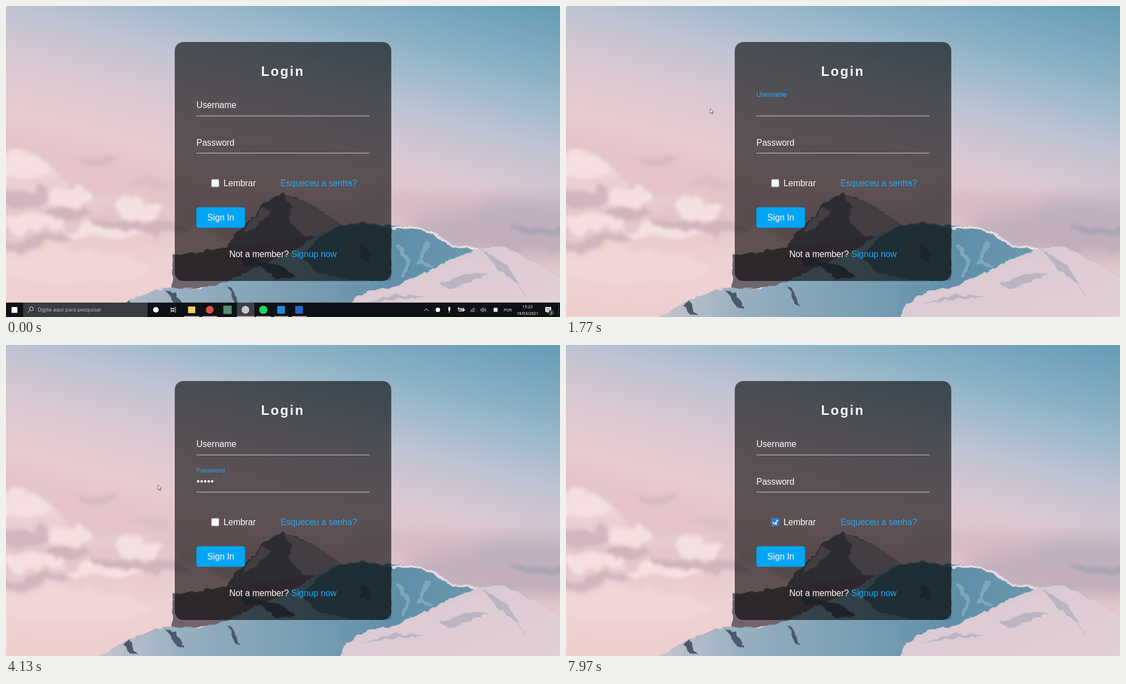
Animation, 998 px wide and 561 px high, one loop 8000 ms. Source, as an HTML page:

```html
<!DOCTYPE html>
<html lang="pt">
<head>
<meta charset="utf-8">
<title>Login</title>
<style>
html, body { margin: 0; width: 100%; height: 100%; overflow: hidden; background: #e3c6c9; }
svg { position: absolute; inset: 0; width: 100%; height: 100%; display: block; }
#scene { will-change: transform; }
text { white-space: pre; }
.form text { font: 15.6px "Liberation Sans", Arial, sans-serif; fill: #fff; }
.form .title { font-size: 24px; font-weight: bold; letter-spacing: 2.6px; }
.form .link { fill: #22abfa; }
.popup text { font: 600 7.8px "Open Sans", "Noto Sans", sans-serif; fill: #f1f1f2; }
.bar text { font: 7.35px "Open Sans", "Noto Sans", sans-serif; fill: #fff; }
.bar .hint { font-size: 9.42px; fill: #c9cacb; }

/* One loop is 8 s, so 1% is 80 ms. */
.anim, .anim text { animation: 8s ease infinite; }
.step { animation-timing-function: step-end; }

.bar { animation-name: bar; }
@keyframes bar { 0% { opacity: 1 } 13.45%, 100% { opacity: 0 } }
.active { animation-name: active; }
@keyframes active { 0% { opacity: 1 } 11.2%, 100% { opacity: 0 } }
.popup { animation-name: popup; }
@keyframes popup { 0% { opacity: 0 } 13.45% { opacity: 1 } 21.7%, 100% { opacity: 0 } }

.form .user { animation-name: user; }
@keyframes user {
  0%, 13.6% { transform: none; fill: #fff }
  19.85%, 21.75% { transform: translateY(-21.3px) scale(.75); fill: #20a8f1 }
  28%, 100% { transform: none; fill: #fff }
}
.form .pass { animation-name: pass; }
@keyframes pass {
  0%, 33.25% { transform: none; fill: #fff }
  39.5%, 78% { transform: translateY(-21.3px) scale(.75); fill: #20a8f1 }
  84.25%, 100% { transform: none; fill: #fff }
}

.caret1 { animation-name: caret1; }
@keyframes caret1 { 0% { opacity: 0 } 13.45% { opacity: 1 } 20%, 100% { opacity: 0 } }
.caret2 { animation-name: caret2; }
@keyframes caret2 {
  0% { opacity: 0; transform: none }
  33.25% { opacity: 1 }
  40% { opacity: 0 }
  40.75% { opacity: 1; transform: translateX(6.3px) }
  42.25% { transform: translateX(12.6px) }
  43.75% { transform: translateX(18.9px) }
  44.6% { transform: translateX(25.2px) }
  45% { opacity: 1; transform: translateX(31.5px) }
  51.25% { opacity: 0; transform: none }
  71.2% { opacity: 1 }
  78%, 100% { opacity: 0; transform: none }
}
.typed { animation-name: typed; }
@keyframes typed {
  0% { clip-path: inset(0 100% 0 0) }
  40.75% { clip-path: inset(0 80% 0 0) }
  42.25% { clip-path: inset(0 60% 0 0) }
  43.75% { clip-path: inset(0 40% 0 0) }
  44.6% { clip-path: inset(0 20% 0 0) }
  45% { clip-path: inset(0) }
  71.2%, 100% { clip-path: inset(0 100% 0 0) }
}
.marked { animation-name: marked; transform-box: fill-box; transform-origin: right; }
@keyframes marked {
  0%, 60.9% { transform: scaleX(0); animation-timing-function: linear }
  62.4% { transform: none; animation-timing-function: step-end }
  71.2%, 100% { transform: scaleX(0) }
}
.checked { animation-name: checked; }
@keyframes checked { 0% { opacity: 0 } 98.7%, 100% { opacity: 1 } }

.pointer { animation-name: move; animation-timing-function: ease-in-out; }
@keyframes move {
  0% { transform: translate(470px, 575px); animation-timing-function: linear }
  4% { transform: translate(548px, 446px); animation-timing-function: linear }
  7% { transform: translate(462px, 265px); animation-timing-function: linear }
  9% { transform: translate(396px, 147px) }
  11.6%, 14% { transform: translate(378.6px, 174.5px) }
  21.2%, 24% { transform: translate(259.7px, 185px) }
  32.5%, 48.2% { transform: translate(369.3px, 250px) }
  51.2%, 55.2% { transform: translate(273.7px, 252.5px) }
  60%, 60.4% { transform: translate(396px, 246px) }
  63.8%, 75.3% { transform: translate(307px, 248px) }
  77.5%, 78.4% { transform: translate(268px, 254px) }
  85.5%, 86% { transform: translate(361px, 283px) }
  95%, 100% { transform: translate(376px, 317px) }
}
.arrow { animation-name: arrow; }
@keyframes arrow {
  0% { opacity: 1 } 9.9% { opacity: 0 } 17% { opacity: 1 } 29.6% { opacity: 0 }
  49.2% { opacity: 1 } 57.8% { opacity: 0 } 63.6%, 100% { opacity: 1 }
}
.beam { animation-name: beam; }
@keyframes beam {
  0% { opacity: 0 } 9.9% { opacity: 1 } 17% { opacity: 0 } 29.6% { opacity: 1 }
  40.75% { opacity: 0 } 48.3% { opacity: 1 } 49.2% { opacity: 0 }
  57.8% { opacity: 1 } 63.6%, 100% { opacity: 0 }
}
</style>
</head>
<body>
<svg id="scene" viewBox="0 0 998 561">
  <defs>
    <linearGradient id="sky" gradientUnits="userSpaceOnUse" x1="998" y1="0" x2="876" y2="468">
      <stop offset="0" stop-color="#639bb5"/><stop offset=".32" stop-color="#94b6c9"/>
      <stop offset=".52" stop-color="#bfc3d2"/><stop offset=".7" stop-color="#d8c8d1"/>
      <stop offset=".9" stop-color="#e7cbcf"/><stop offset="1" stop-color="#e4c4c8"/>
    </linearGradient>
    <linearGradient id="mist" x2="0" y2="1">
      <stop offset="0" stop-color="#efd8da"/><stop offset=".35" stop-color="#e2c5ca"/>
      <stop offset=".6" stop-color="#eed2d3"/><stop offset="1" stop-color="#efcdcc"/>
    </linearGradient>
    <linearGradient id="slope" gradientUnits="userSpaceOnUse" x1="165" y1="0" x2="998" y2="0">
      <stop offset="0" stop-color="#c5c4ce"/><stop offset=".2" stop-color="#93aebf"/>
      <stop offset=".42" stop-color="#7c9fb3"/><stop offset=".65" stop-color="#5f8fa9"/>
      <stop offset="1" stop-color="#78a0b5"/>
    </linearGradient>
    <linearGradient id="snow" x2="1" y2="1">
      <stop offset="0" stop-color="#b7b9c7"/><stop offset=".4" stop-color="#dccbd3"/><stop offset="1" stop-color="#e3cfd5"/>
    </linearGradient>
    <filter id="puff" x="-20%" y="-20%" width="140%" height="140%">
      <feTurbulence type="fractalNoise" baseFrequency=".022" numOctaves="4" seed="5"/>
      <feDisplacementMap in="SourceGraphic" scale="42" xChannelSelector="R" yChannelSelector="G"/>
      <feGaussianBlur stdDeviation="3"/>
    </filter>
    <filter id="soft" x="-50%" y="-80%" width="200%" height="260%"><feGaussianBlur stdDeviation="16"/></filter>
    <filter id="rough" x="-10%" y="-10%" width="120%" height="120%">
      <feTurbulence type="fractalNoise" baseFrequency=".07" numOctaves="3" seed="2"/>
      <feDisplacementMap in="SourceGraphic" scale="9" xChannelSelector="R" yChannelSelector="G"/>
      <feGaussianBlur stdDeviation=".5"/>
    </filter>
  </defs>
  <rect width="998" height="561" fill="url(#sky)"/>
  <g filter="url(#soft)">
    <ellipse cx="930" cy="400" rx="210" ry="55" fill="#b5a7b7" opacity=".75"/>
    <ellipse cx="730" cy="360" rx="120" ry="30" fill="#d3b8c0" opacity=".7"/>
    <ellipse cx="480" cy="400" rx="190" ry="40" fill="#d5b5bb" opacity=".7"/>
  </g>
  <g filter="url(#puff)">
    <ellipse cx="168" cy="278" rx="46" ry="9" fill="#d3bac4" opacity=".8"/>
    <ellipse cx="262" cy="322" rx="50" ry="8" fill="#d9bfc6" opacity=".7"/>
    <ellipse cx="965" cy="404" rx="52" ry="7" fill="#9d9cae" opacity=".75"/>
    <ellipse cx="840" cy="408" rx="80" ry="9" fill="#c4b0bb" opacity=".7"/>
    <ellipse cx="940" cy="430" rx="80" ry="10" fill="#c0adb8" opacity=".6"/>
    <path fill="url(#mist)" d="M-30 268L40 264 85 284 105 312 150 332 190 350 250 346 310 378 420 430V600H-30Z"/>
    <g fill="#f5e1e1">
      <ellipse cx="30" cy="292" rx="48" ry="22"/><ellipse cx="112" cy="342" rx="46" ry="18"/>
      <ellipse cx="235" cy="365" rx="45" ry="13"/><ellipse cx="50" cy="392" rx="60" ry="13"/>
      <ellipse cx="170" cy="410" rx="70" ry="12"/>
    </g>
    <g fill="#c6a9b6" opacity=".62">
      <ellipse cx="28" cy="345" rx="48" ry="18"/><ellipse cx="112" cy="376" rx="50" ry="11"/>
      <ellipse cx="48" cy="424" rx="62" ry="10"/><ellipse cx="222" cy="392" rx="60" ry="9"/>
      <ellipse cx="285" cy="402" rx="40" ry="11"/>
    </g>
    <ellipse cx="110" cy="470" rx="150" ry="28" fill="#f2d9d9" opacity=".8"/>
  </g>
  <g filter="url(#rough)">
    <path fill="#6d727d" d="M398 436L412 410 440 386 460 360 480 346 499 338 530 349 560 363 600 392 560 424 470 434Z"/>
    <path fill="#a69ca3" d="M499 338L516 362 508 384 534 412 560 422 600 392 560 363ZM462 362L478 372 452 398 426 412 440 388Z"/>
    <path fill="#6f656d" d="M300 448L345 444 400 434 470 425 560 416 610 420 480 485 400 505 300 512Z"/>
    <path fill="url(#slope)" d="M160 566L215 534 270 512 305 508 350 511 400 496 450 472 520 440 560 415 600 394 640 390 700 397 735 398 770 409 805 433 850 437 893 432 935 453 1005 492V570Z"/>
    <path fill="#4f6f84" d="M600 396L640 392 694 400 694 496H620L560 480 530 450 562 420Z"/>
    <path fill="url(#snow)" d="M600 570L612 537 650 514 700 506 760 480 800 457 850 437 893 432 935 453 1005 492V570Z"/>
    <path fill="none" stroke="#e7dbe0" stroke-width="4" d="M694 401L735 399 770 410 805 434 850 438"/>
    <path fill="none" stroke="#8fb1c3" stroke-width="7" opacity=".7" d="M705 430L725 460 715 490M760 425L745 462 770 470"/>
    <path fill="#a9a9bb" opacity=".65" d="M860 440L905 470 940 530 920 500 880 470ZM640 540L700 520 760 524 690 530ZM780 500L840 480 870 485 800 510Z"/>
    <path fill="#4d5968" d="M288 514L306 518 320 546 308 542ZM220 532L230 546 238 560 226 556 212 540ZM400 506L412 520 424 542 410 536ZM414 448L446 452 462 466 430 470ZM452 460L500 470 522 488 484 492ZM640 428L654 440 656 466 640 454Z"/>
  </g>
</svg>

<svg viewBox="0 0 998 561">
  <rect x="304" y="65" width="390" height="431" rx="15.5" opacity=".6"/>
  <g class="form">
    <text class="title" x="459.6" y="125.7">Login</text>
    <path stroke="#d0cbcb" d="M343 198.3H655M343 265.3H655"/>
    <g class="anim" transform="translate(343 184)"><text class="user">Username</text></g>
    <g class="anim" transform="translate(343 251.5)"><text class="pass">Password</text></g>
    <rect class="anim marked" x="343" y="237" width="32" height="18" fill="#3390ff"/>
    <g class="anim step typed" fill="#fff">
      <rect x="343" y="237" width="31.5" height="18" fill="none"/>
      <circle cx="346.2" cy="246" r="2.2"/><circle cx="352.5" cy="246" r="2.2"/><circle cx="358.8" cy="246" r="2.2"/>
      <circle cx="365.1" cy="246" r="2.2"/><circle cx="371.4" cy="246" r="2.2"/>
    </g>
    <rect x="370" y="312.6" width="13.8" height="13.8" rx="2" fill="#fff" stroke="#77706f" stroke-width=".5"/>
    <g class="anim step checked">
      <rect x="369.7" y="312.2" width="14.4" height="14.4" rx="2" fill="#2f80d2"/>
      <path d="M372.6 319.6L375.6 322.6 381.4 316" fill="none" stroke="#fff" stroke-width="2"/>
    </g>
    <text x="391.8" y="325">Lembrar</text>
    <text class="link" x="494.4" y="325">Esqueceu a senha?</text>
    <rect x="343" y="363" width="87.5" height="37" rx="4.5" fill="#03a5f5"/>
    <text x="362.6" y="387.3">Sign In</text>
    <text x="402.2" y="453.2">Not a member?</text>
    <text class="link" x="514" y="453.2">Signup now</text>
  </g>
  <path class="anim step caret1" d="M343.5 170V188" stroke="#fff" stroke-width=".9"/>
  <path class="anim step caret2" d="M343.5 237V255" stroke="#fff" stroke-width=".9"/>

  <g class="anim step popup">
    <rect x="343" y="198.7" width="140.5" height="150.5" rx="2" fill="#28292b"/>
    <text x="350.8" y="218.4">teovaln@example.com</text>
    <text x="350.8" y="241.8">marcelvaldo@example.com</text>
    <text x="350.8" y="265.2">qwpolkj</text>
    <text x="350.8" y="288.6">uvo</text>
    <text x="350.8" y="312">silviamarinetta@example.com</text>
    <text x="350.8" y="335.4">pvorel@example.com</text>
  </g>

  <g class="anim step bar">
    <rect y="535" width="998" height="26" fill="#0e1214"/>
    <rect x="31" y="535" width="224" height="26" fill="#3a3d3f"/>
    <rect class="anim step active" x="416" y="535" width="31.5" height="26" fill="#3c4042"/>
    <rect x="10" y="543" width="10.5" height="10.5" fill="#fff"/>
    <g fill="none" stroke="#e6e6e6">
      <circle cx="45.8" cy="546.3" r="3.4"/><path d="M43.3 548.8L39 553"/>
      <path d="M297 543V545.5H303V543M297 553V550.5H303V553M297 546.5H303V549.5H297ZM305.5 543V553" stroke-width=".9"/>
    </g>
    <text class="hint" x="57" y="551.4">Digite aqui para pesquisar</text>
    <circle cx="270" cy="548" r="5" fill="#fff"/>
    <rect x="328" y="542" width="13" height="12" fill="#f5cc62"/>
    <circle cx="367" cy="548" r="7" fill="#dc5144"/>
    <rect x="391.5" y="540.5" width="15" height="15" fill="#5d8a78"/>
    <circle cx="431.3" cy="548" r="7" fill="#c8cacb"/>
    <circle cx="463.5" cy="548" r="7.5" fill="#1fd660"/>
    <rect x="488.5" y="541" width="14" height="14" fill="#2489d4"/>
    <rect x="521" y="541" width="14" height="14" fill="#2a66bd"/>
    <path stroke="#cdb6bd" stroke-width="1.6" d="M321 560.2H348M354 560.2H380.5M416 560.2H447.5M450.5 560.2H477M483 560.2H509M515 560.2H542"/>
    <circle cx="778" cy="548" r="4" fill="#fff"/>
    <rect x="878.5" y="544.5" width="7" height="7" fill="#fff"/>
    <g fill="none" stroke="#fff">
      <path d="M753.5 550L757.3 546.2 761 550"/>
      <path d="M798.6 544.3V548.5" stroke-width="3.4" stroke-linecap="round"/><path d="M798.6 550V553.5" />
      <rect x="816" y="545.5" width="8.5" height="5"/><path d="M818 548H824M825.5 547V549.5M815 544V547" stroke-width="2"/>
      <path d="M837.5 552A7 7 0 0 1 844.5 545M840 552A4.5 4.5 0 0 1 844.5 547.5M842.3 552A2.2 2.2 0 0 1 844.5 549.7" stroke-width=".8"/>
      <path d="M855.5 546.8H857.3L859.5 544.5V551.8L857.3 549.5H855.5ZM861.4 546.5Q862.6 548 861.4 549.8M863.3 545Q865.2 548 863.3 551.2" stroke-width=".8"/>
    </g>
    <text x="904" y="550.8" text-anchor="middle">POR</text>
    <text x="939.5" y="544.7" text-anchor="middle">15:23</text>
    <text x="939.5" y="556.7" text-anchor="middle">16/03/2021</text>
    <path d="M971.5 543H982V551.5H977L974.5 554V551.5H971.5Z" fill="#fff"/>
    <path d="M973.5 545.7H980M973.5 548.3H980" stroke="#0e1214" stroke-width=".8"/>
    <circle cx="982" cy="553" r="4.6" fill="#25292b" stroke="#999" stroke-width=".6"/>
    <text x="982" y="555.6" text-anchor="middle">3</text>
    <path d="M995.5 535V561" stroke="#54585a" stroke-width=".6"/>
  </g>

  <g class="anim pointer">
    <path class="anim step arrow" d="M0 0V8.8L2 7 3.4 10 4.8 9.4 3.5 6.4H6.2Z" fill="#fff" stroke="#15171b" stroke-width=".7"/>
    <path class="anim step beam" d="M-2-4.5H2M0-4.5V4.5M-2 4.5H2" fill="none" stroke="#101010" stroke-width=".9"/>
  </g>
</svg>
</body>
</html>
```
